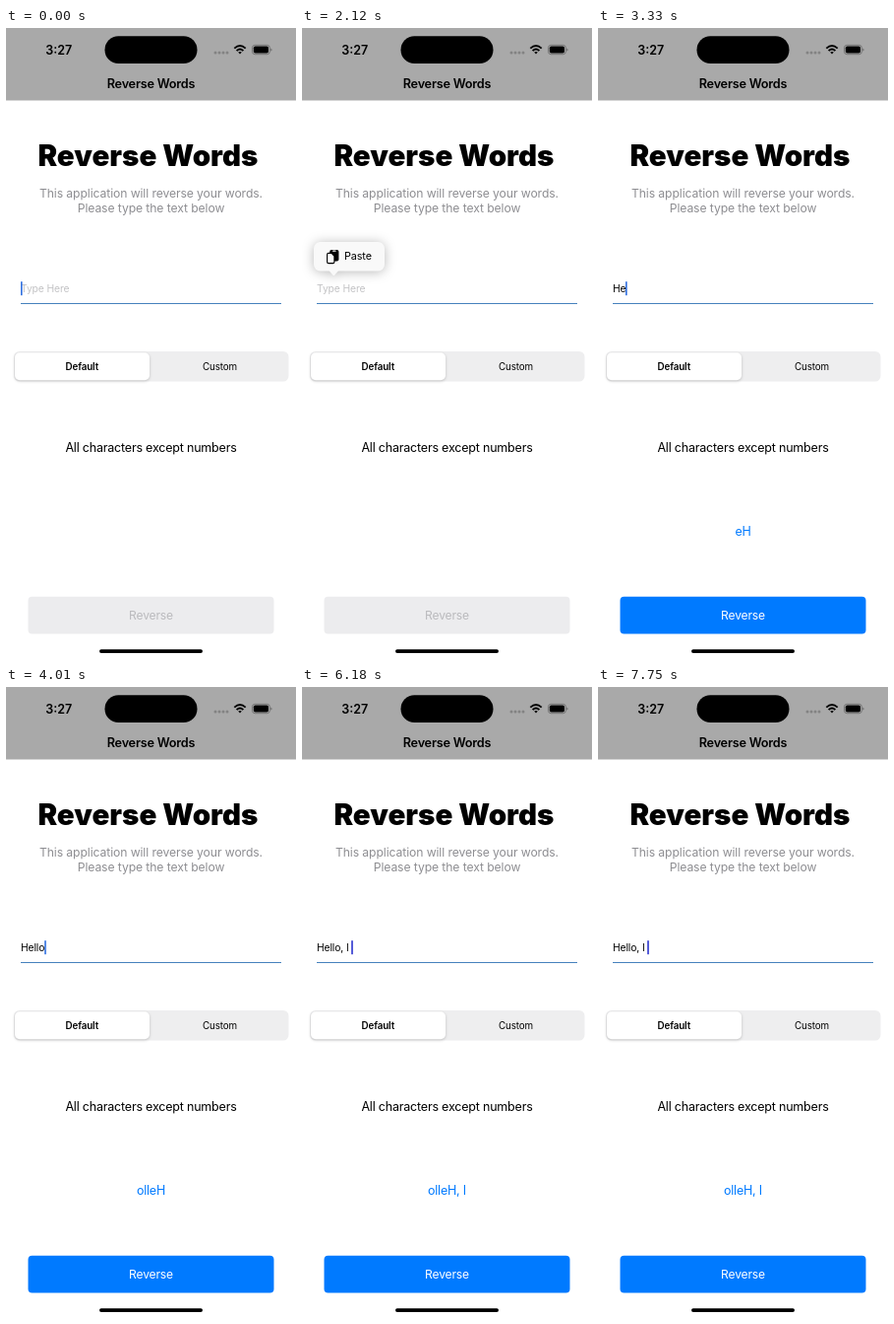
These frames come from a looping animation (295x640 px, 8 s). An HTML page:

```html
<!DOCTYPE html>
<html lang="en">
<head>
<meta charset="utf-8">
<title>Reverse Words</title>
<style>
  html, body { margin: 0; width: 100%; height: 100%; overflow: hidden; background: #fff; }
  svg { display: block; width: 100vw; height: 100vh; font-family: Inter, Roboto, sans-serif; }
  .mid { text-anchor: middle; }
  .semi { font-weight: 600; }
  .title { font-size: 29.5px; font-weight: 900; }
  .nav { font-size: 12.7px; letter-spacing: -.22px; }
  .sub { font-size: 12.2px; letter-spacing: -.1px; fill: #8e8e92; }
  .body { font-size: 12.5px; letter-spacing: -.2px; }
  .button { font-size: 12.1px; letter-spacing: -.15px; }
  .field { font-size: 10.3px; letter-spacing: -.1px; }
  .tab { font-size: 9.8px; letter-spacing: -.1px; }
  .menu { filter: drop-shadow(0 1px 6px rgba(0, 0, 0, .28)); }
</style>
</head>
<body>
<svg viewBox="0 0 295 640">
  <rect width="295" height="640" fill="#fff"/>

  <!-- Status and navigation bar -->
  <rect width="295" height="73.5" fill="#a9a9a9"/>
  <rect x="100.5" y="8.3" width="94" height="27.8" rx="13.9"/>
  <text class="semi" x="40.2" y="26.7" font-size="12.5">3:27</text>
  <g fill="#838383">
    <circle cx="213" cy="25" r="1.5"/><circle cx="217" cy="25" r="1.5"/>
    <circle cx="221" cy="25" r="1.5"/><circle cx="225" cy="25" r="1.5"/>
  </g>
  <g fill="none" stroke="#000" stroke-width="1.9">
    <path d="M232.3 20.6Q238 15.2 243.7 20.6M234.6 23.1Q238 20 241.4 23.1"/>
    <path d="M236.2 24.6Q238 23.2 239.8 24.6L238 26.5Z" fill="#000" stroke="none"/>
  </g>
  <rect x="250.5" y="17.3" width="17.8" height="9.4" rx="2.8" fill="none" stroke="#6c6c6c" stroke-width=".9"/>
  <rect x="251.8" y="18.6" width="15.2" height="6.8" rx="1.7"/>
  <path d="M269.3 20.4q1.3.5 1.3 1.6t-1.3 1.6z" fill="#6c6c6c"/>
  <text class="nav semi mid" x="147.5" y="61.3">Reverse Words</text>

  <!-- Heading -->
  <text class="title mid" x="144.4" y="140.4">Reverse Words</text>
  <g class="sub mid">
    <text x="147.5" y="171.8">This application will reverse your words.</text>
    <text x="147.5" y="187">Please type the text below</text>
  </g>

  <!-- Text field -->
  <text id="placeholder" class="field" x="15" y="268.2" fill="#c3c3c5">Type Here</text>
  <text id="typed" class="field" x="15" y="268.2"></text>
  <rect id="caret" y="257.2" width="1.6" height="14"/>
  <rect x="15" y="279" width="265" height="1" fill="#4681bd"/>

  <!-- Segmented control -->
  <rect x="8" y="328" width="279.5" height="30.5" rx="5.5" fill="#eeeeef"/>
  <rect x="9" y="329.2" width="137" height="28" rx="5" fill="#fff" style="filter:drop-shadow(0 1px 1.5px rgba(0,0,0,.2))"/>
  <text class="tab semi mid" x="77.3" y="346.8">Default</text>
  <text class="tab mid" x="217.5" y="346.8">Custom</text>
  <text class="body mid" x="147.5" y="429.6">All characters except numbers</text>

  <!-- Result and button -->
  <text id="result" class="body mid" x="147.5" y="514.8" fill="#007aff"></text>
  <rect id="button" x="22.5" y="576.8" width="250" height="37.6" rx="4"/>
  <text id="label" class="button mid" x="147.5" y="600.2">Reverse</text>
  <rect x="95" y="630.2" width="105" height="3.8" rx="1.9"/>

  <!-- Paste menu -->
  <g id="menu" class="menu">
    <path d="M27 245.5L31.3 250.4Q32.3 251.4 33.3 250.4L37.6 245.5Z" fill="#f9f9f9"/>
    <rect x="12" y="217" width="72" height="29.5" rx="6.5" fill="#f9f9f9"/>
    <rect x="28.2" y="225" width="9.2" height="11.6" rx="1.8"/>
    <rect x="31" y="225.6" width="3.6" height="1.2" rx=".6" fill="#f9f9f9"/>
    <path d="M26.9 228.4h3.2l2.8 2.9v6q0 1.3-1.3 1.3h-4.7q-1.3 0-1.3-1.3v-7.6q0-1.3 1.3-1.3z" fill="#f9f9f9" stroke="#000" stroke-width="1.1"/>
    <text x="43" y="235.4" font-size="10.8" letter-spacing="-.1">Paste</text>
  </g>
</svg>
<script>
  const LOOP = 8000;
  const el = id => document.getElementById(id);
  const [placeholder, typed, caret, result, button, label, menu] =
    ["placeholder", "typed", "caret", "result", "button", "label", "menu"].map(el);

  // Each track holds its value until the next start time.
  const typing = [[0, "", 15], [2230, "H", 22.2], [3330, "He", 28], [3660, "Hell", 33],
    [4010, "Hello", 39.2], [5290, "Hello,", 42.2], [5810, "Hello, ", 44.7], [6180, "Hello, I ", 50.2]];
  const caretAlpha = [[0, 1], [260, .5], [380, 0], [620, .5], [740, 1], [1280, .5], [1390, 0],
    [1660, 1], [1770, .5], [1890, 0], [2230, 1], [2740, 0], [3330, 1], [4520, .5], [4630, 0],
    [5290, 1], [6680, .5], [6800, 0], [7640, .5], [7750, 1]];
  const menuPose = [[0, 0, 0], [1770, .5, .3], [1890, .9, .85], [2000, 1, 1],
    [2230, .63, .65], [2340, .4, .2], [2450, 0, 0]];

  const at = (track, t) => track.findLast(step => step[0] <= t);

  // Letters flip inside each word; punctuation keeps its place.
  const reverseWords = text =>
    text.trim().replace(/[a-z]+/gi, word => [...word].reverse().join(""));

  function draw(t) {
    const [, text, caretX] = at(typing, t);
    typed.textContent = text;
    result.textContent = reverseWords(text);
    placeholder.style.opacity = text ? 0 : 1;
    button.setAttribute("fill", text ? "#007aff" : "#ececee");
    label.setAttribute("fill", text ? "#fff" : "#bababd");

    caret.setAttribute("x", caretX);
    caret.setAttribute("fill", t < 5290 ? "#2f6fe0" : "#2c35cf");
    caret.style.opacity = at(caretAlpha, t)[1];

    const [, scale, alpha] = at(menuPose, t);
    menu.setAttribute("transform", `translate(32.5 251) scale(${scale}) translate(-32.5 -251)`);
    menu.style.opacity = alpha;
  }

  const start = performance.now();
  function tick() {
    draw((performance.now() - start) % LOOP);
    requestAnimationFrame(tick);
  }
  tick();
</script>
</body>
</html>
```
